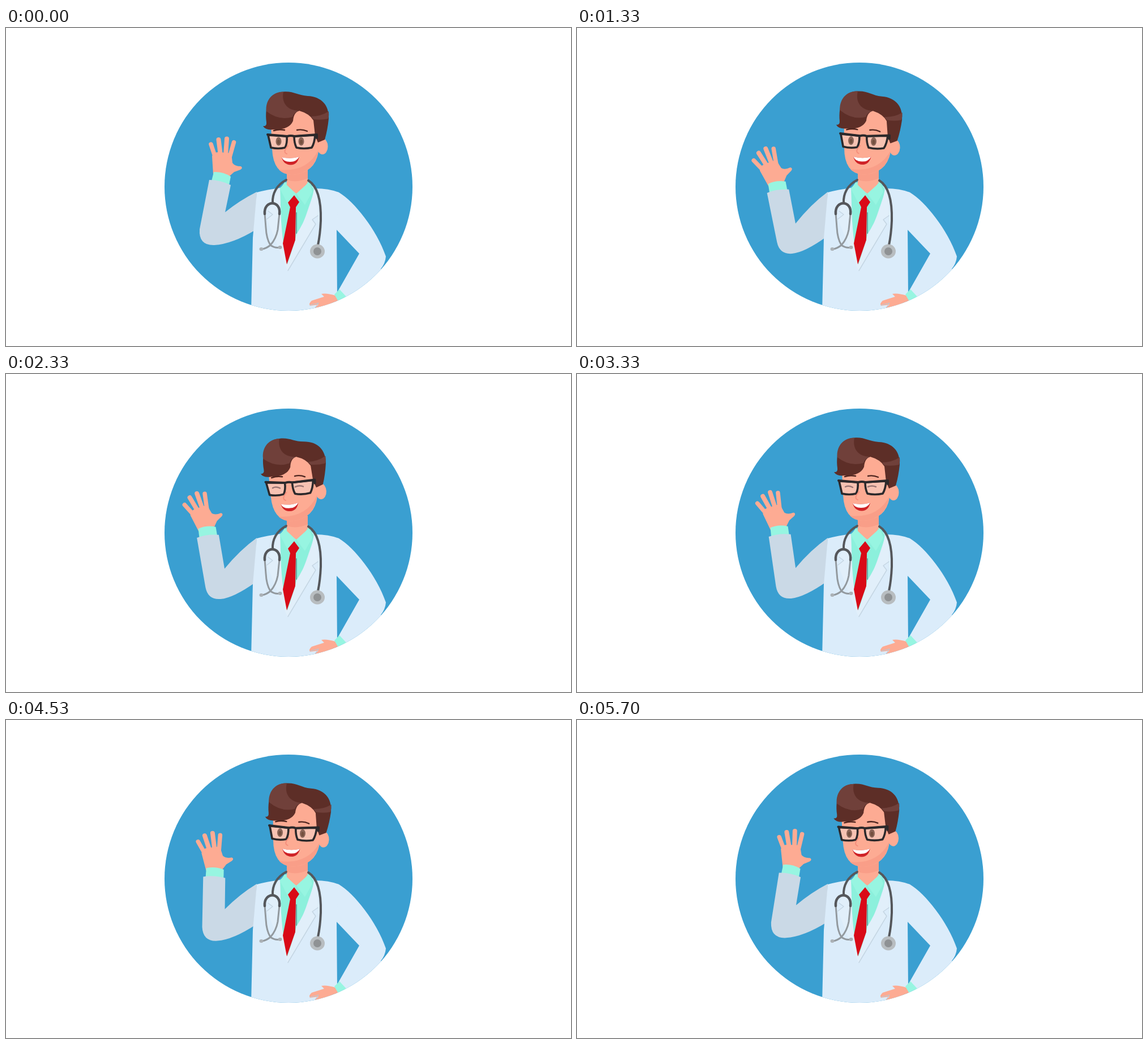
Animation, 998 px wide and 561 px high, one loop 5.73 s. Source, as an HTML page with a canvas:

```html
<!DOCTYPE html>
<html lang="en">
<head>
<meta charset="utf-8">
<title>Waving doctor</title>
<style>
html, body { margin: 0; width: 100%; height: 100%; overflow: hidden; background: #fff; }
canvas { display: block; width: 100%; height: 100%; }
</style>
</head>
<body>
<canvas id="stage" width="998" height="561"></canvas>
<script>
const ctx = document.getElementById('stage').getContext('2d');
const LOOP = 5730;
const RAD = Math.PI / 180;
const SKIN = '#fdab93', SHADE = '#f99e88', MINT = '#97f5e1', COAT = '#dbecfa', SLEEVE = '#cad9e6';

const lerp = (a, b, k) => a + (b - a) * k;

function fill(d, color) {
  ctx.fillStyle = color;
  ctx.fill(new Path2D(d));
}

function line(d, color, width) {
  ctx.strokeStyle = color;
  ctx.lineWidth = width;
  ctx.stroke(new Path2D(d));
}

function oval(x, y, rx, ry, color) {
  ctx.fillStyle = color;
  ctx.beginPath();
  ctx.ellipse(x, y, rx, ry, 0, 0, 7);
  ctx.fill();
}

function turn(x, y, angle) {
  ctx.translate(x, y);
  ctx.rotate(angle);
  ctx.translate(-x, -y);
}

// 25 poses a second; the first of every five is held longer
function poseAt(ms) {
  const part = ms % 200;
  return Math.floor(ms / 200) * 5 + [70, 100, 130, 170].filter(s => part >= s).length;
}

// 0 = hand at the right, 1 = hand at the left
function waveAt(n) {
  const p = n % 24;
  return p < 9 ? p / 9 : Math.max(0, (23.3 - p) / 14.3);
}

function tiltAt(n) {
  const p = n % 72;
  const right = 2.3, left = -2.8;
  if (p < 12) return 0;
  if (p < 24) return lerp(0, right, (p - 12) / 12);
  if (p < 45) return right;
  if (p < 57) return lerp(right, left, (p - 45) / 12);
  if (p < 60) return left;
  return lerp(left, 0, (p - 60) / 12);
}

function blinkAt(n) {
  const p = n % 24;
  return p >= 10 && p <= 12;
}

function drawHand(k) {
  ctx.save();
  turn(381, 258, -3 * RAD * k);
  fill('M364 226 Q367 219 375 219 L398 221 L400 238 Q404 244 415 244 Q419 247 414 250 L403 254 L394 262 L366 258 Z', SKIN);
  line('M362 205 L370 229', SKIN, 7.5);
  line('M375.500 197 L379 225', SKIN, 8);
  line('M390 195.500 L388 224', SKIN, 8);
  line('M402.500 201.500 L395 228', SKIN, 7.5);
  ctx.restore();
  fill('M367 254 Q383 253 397 262 L394 277 L362 274 Z', MINT);
}

function drawWavingArm(k) {
  const angle = -22.5 * RAD * k, c = Math.cos(angle), s = Math.sin(angle);
  const ex = lerp(365, 374.5, k), ey = lerp(355, 369, k);

  ctx.save();
  ctx.translate(ex, ey);
  ctx.rotate(angle);
  ctx.translate(-365, -355);
  drawHand(k);
  ctx.restore();

  const at = (x, y) => {
    const dx = x - 365, dy = y - 355;
    return [ex + dx * c - dy * s, ey + dx * s + dy * c];
  };
  const mix = (x0, y0, x1, y1) => [lerp(x0, x1, k), lerp(y0, y1, k)];
  ctx.beginPath();
  ctx.moveTo(...at(359, 268));
  ctx.lineTo(...at(342, 355));
  ctx.quadraticCurveTo(...mix(340, 384, 358, 400), ...mix(368, 383, 380, 398));
  ctx.quadraticCurveTo(...mix(400, 381, 402, 396), ...mix(441, 356, 441, 368));
  ctx.lineTo(443, 289);
  ctx.quadraticCurveTo(...mix(413, 304, 413, 311), ...mix(387, 325, 386, 345));
  ctx.lineTo(...at(397, 277));
  ctx.quadraticCurveTo(...at(378, 268), ...at(359, 268));
  ctx.fillStyle = SLEEVE;
  ctx.fill();
}

function drawBody() {
  fill('M582 289 L588 290 C615 306 655 356 671 403 Q670 415 662 425 L680 440 L606 484 L587 463 L624 398 L584 356 Z', COAT);
  fill('M443 290 Q462 285 484 282 L500 274 L535 274 L546 283 Q570 283 588 290 L584 356 L585 472 L562 500 L433 500 L436 370 Z', COAT);

  // shirt, neck and collar
  fill('M484 282 L497 270 L535 270 L545 286 L530 330 L497 418 L487 370 Z', '#8cf0dc');
  fill('M496 250 H533 V272 Q526 285 513 292 Q502 287 496 278 Z', SKIN);
  fill('M496 250 H533 V265 Q514 274 496 268 Z', SHADE);
  fill('M493 271 L496 277 L512 292 L498 311 L484 284 Z', MINT);
  fill('M534 270 L541 289 L528 312 L513 292 L533 274 Z', MINT);

  // lapels
  fill('M484 282 Q484 330 489 374 L497 417 L497 428 L461 337 L470 327 L463 323 Z', '#e1effa');
  fill('M544 283 Q538 325 513 364 L510 377 L497 417 L497 428 L547 346 L541 338 L551 331 Q553 305 544 283 Z', '#e1effa');
  line('M463 323 L471 329 L461 337 M551 331 L541 338 L547 346 L498 428', '#c5d6e3', 1.5);

  // tie
  line('M513 326 V362', '#65a79f', 2);
  fill('M509 295 L518 307 L512 316 L511 374 L496 417 L489 380 L502 316 L498 308 Z', '#d90a17');

  // stethoscope
  line('M495 268 C478 277 470 292 471 309 M534 269 C550 279 557 302 556 340 Q555 364 551 383', '#55575b', 4);
  line('M457 327 L459 352 Q460 372 467 383 Q460 389 452 390 M483 327 L480 356 Q477 372 467 383 Q475 389 485 387', '#92999e', 3);
  line('M457 328 C455 303 486 303 483 328', '#55575b', 4.5);
  oval(451, 390, 3.5, 3, '#abb1b6');
  oval(484, 387, 3.5, 3, '#abb1b6');
  oval(550, 394, 13, 12.5, '#b8bdc0');
  oval(550, 394, 7, 7, '#8f9294');

  // hand on the hip
  fill('M545 494 L552 488 L537 490 Q534 486 540 481 L562 474 L557 469 Q566 467 582 472 L588 482 L560 498 Z', SKIN);
  line('M537 489 L552 485 L546 494', '#b9c8d5', 1.2);
  fill('M580 470 L589 461 L602 475 L588 484 Z', MINT);
}

function drawEyes(closed) {
  if (closed) {
    line('M474 199 Q480 196 487 200 M514 199 Q521 196 528 199', '#9c7774', 2.5);
    return;
  }
  for (const x of [481.5, 521.5]) {
    oval(x, 200, 5, 7.5, '#8b6558');
    oval(x, 201, 2.5, 4, '#74503f');
  }
}

function drawHead(tilt, closed) {
  ctx.save();
  turn(515, 262, tilt * RAD);

  oval(559, 209, 9.5, 14, SKIN);
  fill('M467 150 L470 213 Q472 258 505 259 Q546 256 552 218 L560 150 L530 140 H500 Z', SKIN);
  fill('M552 215 Q546 256 505 259 Q490 258 482 250 Q532 255 552 215 Z', SHADE);

  // hair
  fill('M454 173 Q461 174 460 166 C457 140 463 113 490 112.500 C508 111 515 119 533 120 C557 121 571 136 570 160 Q568 180 563 197 L551 202 L546 190 L543 163 Q536 151 518 146 Q508 149 507 164 Q500 180 473 179 Q459 181 454 173 Z', '#5d2e27');
  fill('M490 112.500 C463 113 458 137 460 147 Q482 164 506 157 Q508 149 518 146 C497 146 486 132 490 112.500 Z', '#70403a');
  fill('M539 156 Q556 156 570 147 Q571 154 569 160 Q556 163 543 161 Z', '#70403a');

  line('M473 181 Q482 178 492 180 M514 180 Q523 178 532 182', '#4e251f', 2.4);

  // glasses
  const lenses = 'M463 189 Q480 190 496 191 Q497 203 493 211 Q481 214 468 211 Z M509 191 Q527 190 546 189 Q545 203 540 211 Q526 214 513 211 Q509 203 509 191 Z';
  fill(lenses, '#f7c2b2');
  drawEyes(closed);
  line(lenses, '#2c292b', 3.6);
  line('M462 188 L497 191 Q503 189 509 191 L549 188 L549 194', '#2c292b', 4);

  line('M498 208 Q488 219 496 222', '#f58f7c', 2);
  fill('M487 228 Q503 232 518 227 Q515 241 503 241.500 Q490 241 487 228 Z', '#cf2227');
  fill('M487 228 Q503 232 518 227 Q513 236 503 236 Q491 237 487 228 Z', '#fff');
  ctx.restore();
}

function draw(n) {
  ctx.fillStyle = '#fff';
  ctx.fillRect(0, 0, 998, 561);
  ctx.save();
  oval(499, 280, 219, 219, '#3a9fd1');
  ctx.beginPath();
  ctx.arc(499, 280, 219, 0, 7);
  ctx.clip();
  ctx.lineCap = ctx.lineJoin = 'round';
  drawWavingArm(waveAt(n));
  drawBody();
  drawHead(tiltAt(n), blinkAt(n));
  ctx.restore();
}

const start = performance.now();
function tick() {
  draw(poseAt((performance.now() - start) % LOOP));
  requestAnimationFrame(tick);
}
tick();
</script>
</body>
</html>
```
